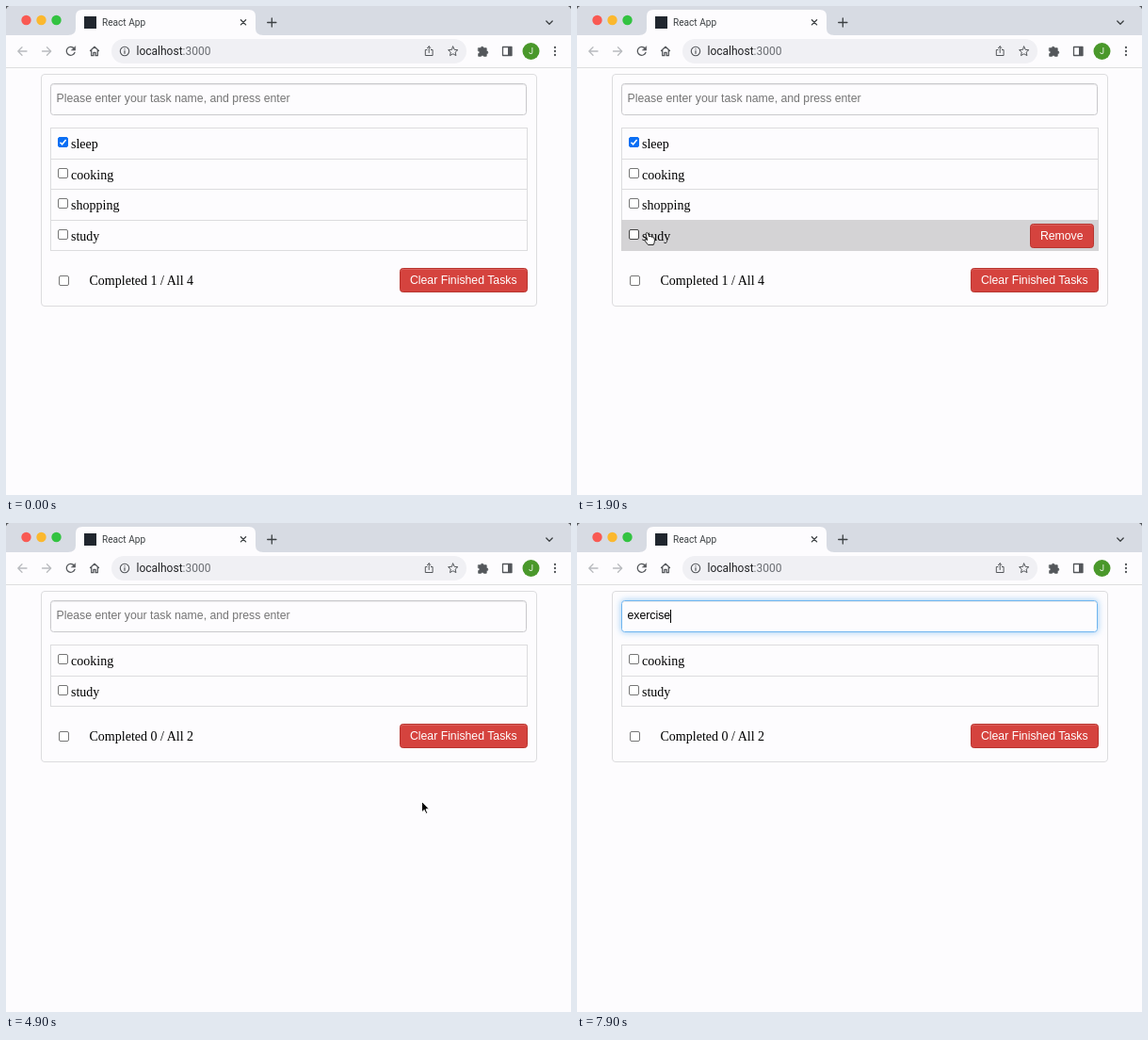
Animation of 600 by 519 pixels, one loop 8000 ms. Source, as an HTML page:

```html
<!DOCTYPE html>
<html lang="en">
<head>
<meta charset="utf-8">
<title>Task list</title>
<style>
html, body { margin: 0; width: 600px; height: 519px; overflow: hidden; background: #55585c; }
#stage { position: relative; width: 600px; height: 519px; overflow: hidden; background: #fdfcfe; border-radius: 5px 5px 0 0; }
svg { position: absolute; left: 0; top: 0; overflow: visible; }
#app div { position: absolute; box-sizing: border-box; white-space: pre; }
#app .panel { border: 1px solid #dcdcde; border-radius: 4px; }
#app .field { border: 1px solid #c9c9cc; border-radius: 3.5px; padding-left: 6px; color: #757575;
  font: 12.28px/31px "Liberation Sans", Arial, sans-serif; box-shadow: inset 0 1px 1px rgba(0,0,0,.075); }
#app .focus { border-color: #6fb5ef; box-shadow: inset 0 1px 1px rgba(0,0,0,.075), 0 0 7px rgba(82,168,236,.6); }
#app .typed { color: #000; }
.caret { position: absolute; top: 9px; width: 1px; height: 14px; background: #000; }
#app .row { border: 1px solid #dcdcde; }
#app .hover { background: #d4d3d5; border-color: #d4d3d5; z-index: 1; }
#app .label { z-index: 2; color: #000; font: 14.03px/32px "Liberation Serif", "Times New Roman", serif; }
#app .check { z-index: 2; border: 1px solid #767676; border-radius: 2px; background: #fff; }
#app .dark { border-color: #444; }
#app .on { border-color: #0b6ff4; background: #0b6ff4; }
#app .button { z-index: 2; border: 1px solid #b8352f; border-radius: 3.5px; background: #d5433e; color: #fff; text-align: center;
  font: 12.28px/24px "Liberation Sans", Arial, sans-serif; box-shadow: inset 0 1px 0 rgba(255,255,255,.15); }
#pointer { z-index: 9; }
</style>
</head>
<body>
<div id="stage">
<svg width="600" height="67" fill="none" stroke-linecap="round" stroke-linejoin="round" font-family="Roboto, sans-serif">
  <path fill="#d7dbe3" d="M0 0H600V31H0Z"/>
  <path fill="#fdfcfe" d="M66 31Q74 31 74 24V11Q74 4 81 4H258Q265 4 265 11V24Q265 31 273 31Z"/>
  <circle cx="21.5" cy="15" r="5.2" fill="#f95a53"/>
  <circle cx="37.5" cy="15" r="5.2" fill="#fbb82e"/>
  <circle cx="53.5" cy="15" r="5.2" fill="#33c341"/>
  <rect x="83" y="11" width="13" height="13" fill="#20262e"/>
  <text x="102" y="21" font-size="10.1" fill="#3c4043">React App</text>
  <g stroke="#3c4043" stroke-width="1.3">
    <path d="M249.4 14.7l5.2 5.2m0-5.2l-5.2 5.2M277.7 17.5h9.2m-4.6-4.6v9.2M573.8 16l3.2 3.2 3.2-3.2"/>
  </g>
  <rect x="112" y="35" width="377" height="26" rx="13" fill="#f0f0f4"/>
  <path stroke="#b9bbbf" stroke-width="1.3" d="M22 48h-9m4-4.2L12.8 48l4.2 4.2M38.500 48h9m-4-4.200 4.200 4.200-4.200 4.200"/>
  <g stroke="#54575b" stroke-width="1.3">
    <path d="M72.300 45A4.500 4.500 0 1 0 73 49.300"/>
    <path fill="#54575b" stroke-width=".5" d="M73.700 43v4.100h-4.100z"/>
    <path d="M89.500 47.500L94 43.300 98.500 47.500M90.700 47v5.700h2.200v-3.400h2.200v3.400h2.200V47"/>
    <circle cx="126" cy="48" r="4.700" stroke-width="1.100"/>
    <path stroke-width="1.200" d="M126 47.700v2.600M126 45.600v.1"/>
    <path stroke-width="1" d="M447 46.500h-1.700v6h7.800v-6h-1.700M449.200 49.500v-6.700m-1.900 1.900l1.900-1.900 1.900 1.900"/>
    <path stroke-width="1" d="M474.700 43l1.500 3.300 3.600.4-2.700 2.400.8 3.500-3.200-1.800-3.200 1.800.8-3.500-2.700-2.400 3.600-.4z"/>
    <path fill="#54575b" stroke-width=".8" d="M501.700 44.700h2.500a1.400 1.400 0 0 1 3 0h3v3a1.500 1.500 0 0 1 0 3.100v2.500h-2.900a1.400 1.400 0 0 0-2.700 0h-2.900v-2.800a1.400 1.400 0 0 0 0-2.800z"/>
    <path stroke-width="1.300" d="M527.500 43.500h9.500v9h-9.500z"/>
    <path fill="#54575b" stroke="none" d="M533 43.500h4v9h-4z"/>
  </g>
  <text x="138.500" y="52" font-size="12" fill="#202124">localhost<tspan fill="#6b6e73">:3000</tspan></text>
  <circle cx="557.500" cy="48" r="9" fill="#4a982b"/>
  <text x="557.500" y="51" text-anchor="middle" font-size="8.500" fill="#fff">J</text>
  <path stroke="#54575b" stroke-width="2.300" d="M583 44v0m0 4v0m0 4v0"/>
  <path stroke="#dededf" d="M0 65.500H600"/>
</svg>
<div id="app"></div>
<svg id="pointer" width="20" height="20" stroke-linejoin="round"><path/></svg>
</div>
<script>
const app = document.getElementById("app");
const pointer = document.getElementById("pointer");
const LOOP = 8000, FOCUS = 5600, CLEAR = 4300, TYPE = 6200;
const PROMPT = "Please enter your task name, and press enter";

// Pointer waypoints: time, x, y
const path = [
  [100, 130, 282], [500, 82, 143], [900, 77.5, 174.5], [1300, 78, 208], [1700, 74.5, 240], [1900, 74.5, 240.5],
  [2300, 61, 176], [2500, 61, 176], [2800, 76, 205], [3000, 61, 208], [3200, 61, 208],
  [3400, 61, 176], [3600, 61, 176], [4100, 441.5, 295.5], [4900, 441.5, 295.5], [5500, 268, 87]
];
const keyTimes = [6200, 6400, 6700, 6900, 7100, 7300, 7500, 7700];

const shapes = {
  arrow: ["M0 0V11.500L2.700 9L4.400 13L6.200 12.200L4.500 8.300H8Z", "#000", "#fff"],
  hand: ["M-1.500 1Q-.5-.8 1 .8L2.200 4.500L3.200 3.900 4.700 4.600 6 4.700 7.400 5.600 8 8 7.500 11 6.700 13H1L-2.500 8.600Q-3 7-1.200 7.300L.2 8Z", "#fff", "#222"],
  beam: ["M-2.500-6.500Q0-6.500 0-4.500V4.500Q0 6.500-2.500 6.500M2.500-6.500Q0-6.500 0-4.500M0 4.500Q0 6.500 2.500 6.500M-1.500 2.500H1.500", "none", "#222"]
};

const rowTop = i => 129 + Math.round(32.5 * i);
const box = (cls, x, y, w, h, html = "") =>
  `<div class="${cls}" style="left:${x}px;top:${y}px;width:${w}px;height:${h}px">${html}</div>`;
const tick = '<svg width="9" height="9"><path d="M1.500 4.700L3.600 6.800 7.600 2" fill="none" stroke="#fff" stroke-width="1.500"/></svg>';
const check = (x, y, on, dark) =>
  box("check" + (on ? " on" : dark ? " dark" : ""), x, y, 11, 11, on ? tick : "");

function pointAt(t) {
  const i = path.findIndex(p => p[0] > t);
  if (i < 0) return path[path.length - 1].slice(1);
  if (i === 0) return path[0].slice(1);
  const [t0, x0, y0] = path[i - 1], [t1, x1, y1] = path[i];
  const k = (t - t0) / (t1 - t0), e = k * k * (3 - 2 * k);
  return [x0 + (x1 - x0) * e, y0 + (y1 - y0) * e];
}

function tasksAt(t) {
  const tasks = [
    ["sleep", true],
    ["cooking", t >= 2400 && t < 3500],
    ["shopping", t >= 3100],
    ["study", false]
  ];
  return t < CLEAR ? tasks : tasks.filter(task => !task[1]);
}

function draw(t) {
  const [x, y] = pointAt(t), shown = t >= 100 && t < TYPE;
  const tasks = tasksAt(t), n = tasks.length, foot = rowTop(n) + 32;
  const typed = "exercise".slice(0, keyTimes.filter(k => k <= t).length);
  const focus = t >= FOCUS;
  const inside = x > 47 && x < 554;
  const hover = shown && inside ? tasks.findIndex((_, i) => y >= rowTop(i) && y < rowTop(i + 1)) : -1;
  const caret = focus ? '<span class="caret"></span>' : "";

  let html = box("panel", 37, 72, 527, rowTop(n) - 12);
  html += box("field" + (focus ? " focus" : "") + (typed ? " typed" : ""), 46.5, 82, 506, 33.5,
    typed ? typed + caret : caret + PROMPT);
  tasks.forEach(([name, done], i) => {
    const top = rowTop(i), over = i === hover;
    html += box("row" + (over ? " hover" : ""), 47, top, 507, rowTop(i + 1) - top + 1);
    html += check(55, top + 9.5, done, over);
    html += box("label", 69, top + .5, 200, 32, name);
    if (over) html += box("button", 480.5, top + 3.5, 68.5, 26, "Remove");
  });
  html += check(55.5, foot - 5, false);
  html += box("label", 88.5, foot - 16, 250, 32, `Completed ${tasks.filter(task => task[1]).length} / All ${n}`);
  html += box("button", 417.5, foot - 13, 136.5, 26, "Clear Finished Tasks");
  app.innerHTML = html;

  const onButton = inside && x > 417 && Math.abs(y - foot) < 13;
  const kind = inside && y > 82 && y < 115 ? "beam" : onButton || (hover >= 0 && x < 125) ? "hand" : "arrow";
  const [d, fill, stroke] = shapes[kind];
  const shape = pointer.firstChild;
  shape.setAttribute("d", d);
  shape.setAttribute("fill", fill);
  shape.setAttribute("stroke", stroke);
  pointer.style.transform = `translate(${x}px,${y}px)`;
  pointer.style.display = shown ? "" : "none";
}

const start = performance.now();
let last = -1;
function frame() {
  const t = Math.floor((performance.now() - start) % LOOP / 100) * 100;
  if (t !== last) draw(last = t);
  requestAnimationFrame(frame);
}
frame();
</script>
</body>
</html>
```
